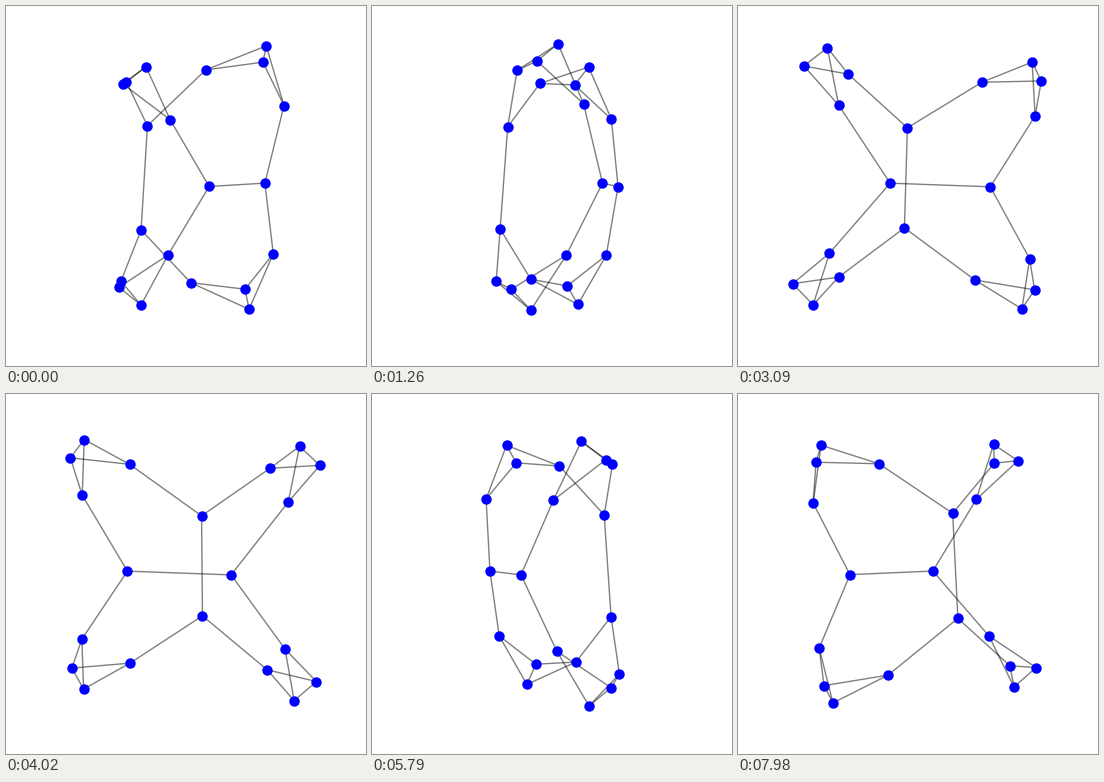
A matplotlib script that plays this animation: 360 by 360 pixels, repeating every 8000 ms.

```python
import numpy as np
import matplotlib.pyplot as plt
from matplotlib.animation import FuncAnimation
from matplotlib.collections import LineCollection

SIZE, DPI = 360, 100
LOOP, TICK = 8000, 20       # ms
STEP = 30                   # ms per degree of turn
CX, CY = 184.9, 175.1       # vanishing point on the stage
EYE = 1946                  # camera distance in pixels

# Four hub nodes, then four diamonds of (near hub, far hub, tip, tip)
NODES = np.array([
    (73.4, -15.5, -2.0), (18.9, 72.3, -5.6),
    (-42.9, -26.2, 54.6), (-49.0, -30.8, -48.1),

    (90.1, -62.4, 73.1), (14.2, -73.3, 107.0),
    (72.3, -78.7, 129.7), (68.2, -103.7, 112.6),

    (-22.0, 109.9, 65.0), (-66.1, 47.0, 101.6),
    (-47.3, 102.5, 120.4), (-71.8, 107.8, 102.5),

    (79.2, -74.7, -69.9), (-0.2, -87.5, -97.0),
    (50.8, -120.4, -101.4), (55.2, -98.1, -121.7),

    (-24.0, 104.0, -77.7), (-71.3, 38.6, -102.0),
    (-75.5, 100.2, -111.6), (-52.3, 91.1, -129.8),
])


def build_edges():
    edges = [(0, 1), (2, 3)]
    for k in range(4):
        a, c, u, v = range(4 + 4 * k, 8 + 4 * k)
        edges += [(k % 2, a), (2 + k // 2, c)]
        edges += [(a, u), (a, v), (c, u), (c, v), (u, v)]
    return np.array(edges)


def project(degrees):
    """Turn the graph about its upright axis and apply perspective."""
    c, s = np.cos(np.radians(degrees)), np.sin(np.radians(degrees))
    x, y, z = NODES.T
    zoom = EYE / (EYE - (x * s - y * c))
    return np.column_stack((CX + (x * c + y * s) * zoom, CY - z * zoom))


EDGES = build_edges()

fig = plt.figure(figsize=(SIZE / DPI, SIZE / DPI), dpi=DPI, facecolor="white")
ax = fig.add_axes([0, 0, 1, 1])
ax.set_xlim(0, SIZE)
ax.set_ylim(SIZE, 0)
ax.axis("off")

lines = LineCollection([], colors="black", alpha=0.5, linewidths=1, zorder=1)
ax.add_collection(lines, autolim=False)
dots, = ax.plot([], [], "o", color="blue", ms=6, mew=1.5, zorder=2)


def update(i):
    pts = project((i * TICK + TICK // 2) // STEP)
    lines.set_segments(pts[EDGES])
    dots.set_data(pts[:, 0], pts[:, 1])
    return lines, dots


anim = FuncAnimation(fig, update, frames=LOOP // TICK, interval=TICK,
                     repeat=True, repeat_delay=0, blit=False)
plt.show()
```
